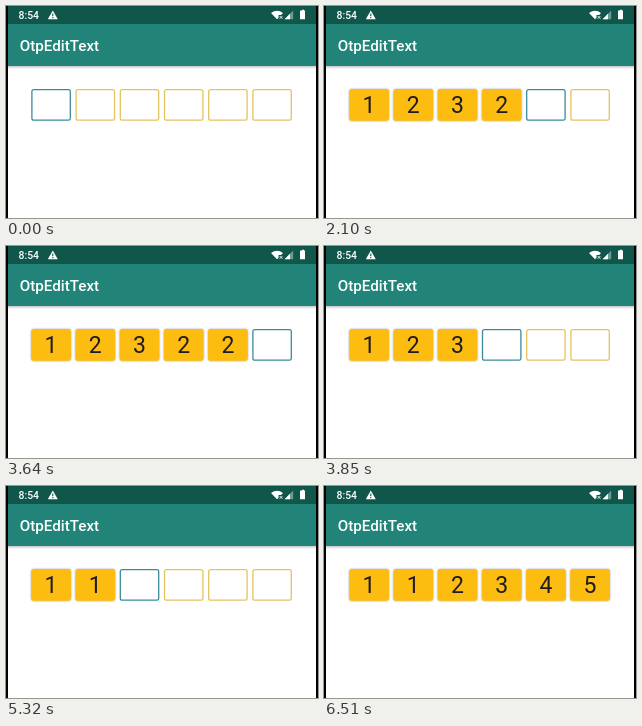
An HTML page for the animation above (7140 ms loop, 312x212 px).

```html
<!DOCTYPE html>
<html lang="en">
<head>
<meta charset="utf-8">
<title>OtpEditText</title>
<style>
  html, body { margin: 0; width: 100%; height: 100%; overflow: hidden; background: #fff; }
  svg { display: block; width: 312px; height: 212px; font-family: Roboto, sans-serif; }
  .bar { font-weight: 500; fill: #fff; }
  .cell rect { fill: #fff; stroke: #e5c35e; stroke-width: 1.3; }
  .cell.active rect { stroke: #3a8c9b; }
  .cell.filled rect { fill: #fdbd10; stroke: #fdbd10; filter: drop-shadow(0 .4px .8px #0005); }
  .cell text { font-size: 23px; text-anchor: middle; fill: #211c22; }
</style>
</head>
<body>
<svg viewBox="0 0 312 212">
  <defs>
    <linearGradient id="shade" x2="0" y2="1">
      <stop stop-color="#000" stop-opacity=".22"/>
      <stop offset="1" stop-color="#000" stop-opacity="0"/>
    </linearGradient>
  </defs>
  <rect width="312" height="212" fill="#fff"/>
  <rect y="60" width="312" height="3" fill="url(#shade)"/>
  <rect width="312" height="60" fill="#228478"/>
  <rect width="312" height="18" fill="#10564b"/>
  <text class="bar" x="12.5" y="13" font-size="10.4">8:54</text>
  <text class="bar" x="13.7" y="45" font-size="15.2">OtpEditText</text>

  <g fill="#fff">
    <path d="M46.8 4.6 51.8 13.2H41.8Z"/>
    <path d="M46.8 7.6V10.2M46.8 11.1V12.2" stroke="#10564b" stroke-width="1.1"/>
    <path d="M265 7Q271 2.6 277 7L275.2 9H272.5V11.8L271 13.2Z"/>
    <path d="M273.6 10 276.4 12.8M276.4 10 273.6 12.8" stroke="#fff" stroke-width=".9"/>
    <path d="M287.2 4.6V13.2H278.6Z" opacity=".4"/>
    <path d="M284 7.8V13.2H278.6Z"/>
    <path d="M295 4.6H296V3.8H298V4.6H299V13.3H294V4.6Z"/>
  </g>

  <g id="cells"></g>
  <path d="M0 0H2V212H0ZM310 0H312V212H310Z" fill="#000"/>
</svg>
<script>
  const LOOP = 7140;
  // [start in ms, entered code]
  const steps = [
    [0, ""], [1330, "1"], [1540, "12"], [1820, "123"], [2030, "1232"],
    [2240, "12322"], [2660, "123223"],
    [3430, "12322"], [3710, "1232"], [3850, "123"], [3990, "12"], [4130, "1"],
    [5320, "11"], [5460, "112"], [5670, "1123"], [5880, "11234"], [6300, "112345"]
  ];

  const svgNode = (name, attrs, parent) => {
    const node = document.createElementNS("http://www.w3.org/2000/svg", name);
    for (const key in attrs) node.setAttribute(key, attrs[key]);
    return parent.appendChild(node);
  };

  const row = document.getElementById("cells");
  const cells = Array.from({ length: 6 }, (_, i) => {
    const group = svgNode("g", { transform: `translate(${25.9 + i * 44.2} 83.6)` }, row);
    svgNode("rect", { width: 38.4, height: 30.6, rx: 1.8 }, group);
    return { group, label: svgNode("text", { x: 19.2, y: 23.3 }, group) };
  });

  let shown = null;
  function show(code) {
    if (code === shown) return;
    shown = code;
    cells.forEach(({ group, label }, i) => {
      const state = i < code.length ? " filled" : i === code.length ? " active" : "";
      group.setAttribute("class", "cell" + state);
      label.textContent = code[i] || "";
    });
  }

  const start = performance.now();
  function tick() {
    const time = (performance.now() - start) % LOOP;
    show(steps.filter(([at]) => at <= time).pop()[1]);
    requestAnimationFrame(tick);
  }
  tick();
</script>
</body>
</html>
```
